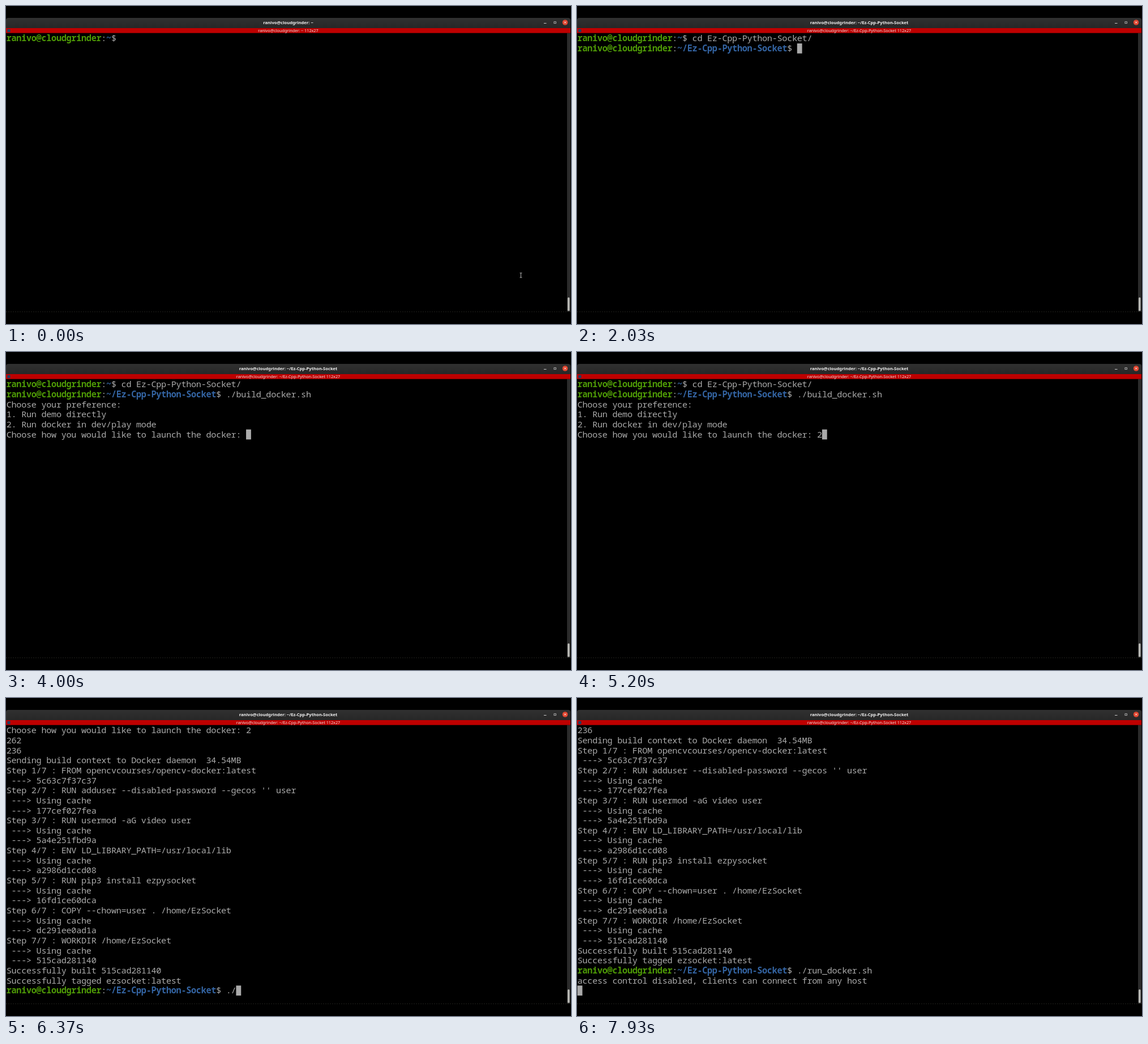
An HTML page with a canvas that plays this animation: 998x561 px, repeating every 8 s.

```html
<!DOCTYPE html>
<html lang="en">
<head>
<meta charset="utf-8">
<title>Terminal session</title>
<style>
  html, body { margin: 0; width: 100%; height: 100%; overflow: hidden; background: #000; }
  canvas { display: block; width: 998px; height: 561px; }
</style>
</head>
<body>
<canvas id="stage" width="998" height="561"></canvas>
<script>
const ctx = document.getElementById('stage').getContext('2d');
const LOOP = 8000;
const ROWS = 27, CELL = 8.82, LINE = 17.65, LEFT = 0.7, TOP = 48.4;
const GREY = '#aaaaaa', GREEN = '#4e9a06', BLUE = '#3465a4';
const MONO = '15.2px "Noto Sans Mono", "DejaVu Sans Mono", monospace';
const SANS = '"Noto Sans", "Open Sans", sans-serif';

const USER = 'ranivo@cloudgrinder';
const REPO = '~/Ez-Cpp-Python-Socket';
const prompt = dir => `${USER}:${dir}$ `;

const step = (n, command, id, cached = true) =>
  `Step ${n}/7 : ${command}\n${cached ? ' ---> Using cache\n' : ''} ---> ${id}\n`;

// Terminal output: [time in ms, text appended at that time]
const log = [
  [0, prompt('~')],
  [130, 'c'], [260, 'd'], [400, ' '],
  [1070, 'E'], [1270, 'z'], [1530, '-Cpp-Python-Socket/'],
  [2000, '\n' + prompt(REPO)],
  [2800, '.'], [2970, '/'], [3200, 'b'], [3370, 'uild_docker.sh'],
  [3770, '\nChoose your preference:\n1. Run demo directly\n' +
         '2. Run docker in dev/play mode\nChoose how you would like to launch the docker: '],
  [4970, '2'],
  [5230, '\n'], [5270, '262\n236\n'],
  [5400, 'Sending build context to Docker daemon  34.54MB\n'],
  [5470, step(1, 'FROM opencvcourses/opencv-docker:latest', '5c63c7f37c37', false)],
  [5500, step(2, "RUN adduser --disabled-password --gecos '' user", '177cef027fea')],
  [5530, step(3, 'RUN usermod -aG video user', '5a4e251fbd9a')],
  [5570, step(4, 'ENV LD_LIBRARY_PATH=/usr/local/lib', 'a2986d1ccd08')],
  [5600, step(5, 'RUN pip3 install ezpysocket', '16fd1ce60dca')],
  [5630, step(6, 'COPY --chown=user . /home/EzSocket', 'dc291ee0ad1a')],
  [5670, step(7, 'WORKDIR /home/EzSocket', '515cad281140')],
  [5700, 'Successfully built 515cad281140\nSuccessfully tagged ezsocket:latest\n' + prompt(REPO)],
  [6070, '.'], [6100, '/'],
  [6600, 'r'], [6830, 'u'], [7030, 'n_docker.sh'],
  [7470, '\n'], [7530, 'access control disabled, clients can connect from any host\n']
];

// Intervals in which the blinking cursor is off
const cursorOff = [[0, 30], [800, 1070], [2400, 2800], [4370, 4970]];

function rect(color, x, y, w, h) {
  ctx.fillStyle = color;
  ctx.fillRect(x, y, w, h);
}

function strokePath(color, width, ...lines) {
  ctx.strokeStyle = color;
  ctx.lineWidth = width;
  ctx.beginPath();
  for (const [x1, y1, x2, y2] of lines) {
    ctx.moveTo(x1, y1);
    ctx.lineTo(x2, y2);
  }
  ctx.stroke();
}

function centred(text, font, color, y) {
  ctx.font = font;
  ctx.letterSpacing = '0px';
  ctx.textAlign = 'center';
  ctx.fillStyle = color;
  ctx.fillText(text, 498.5, y);
}

function drawWindow(dir) {
  const bar = ctx.createLinearGradient(0, 21, 0, 39);
  bar.addColorStop(0, '#303030');
  bar.addColorStop(1, '#272727');
  ctx.fillStyle = bar;
  ctx.beginPath();
  ctx.roundRect(0, 21, 997, 18, [4, 4, 0, 0]);
  ctx.fill();
  rect('#be0000', 0, 39, 997, 8.7);
  rect('#1d3f63', 2.5, 41, 5, 5);

  const title = `${USER}: ${dir}`;
  centred(title, `bold 7.6px ${SANS}`, '#f2f2f2', 31.8);
  centred(`${title} 112x27`, `7.25px ${SANS}`, '#f0dcdc', 45.8);

  strokePath('#c8c8c8', 1, [950, 30.5, 954.5, 30.5]);
  ctx.lineWidth = 0.8;
  ctx.strokeRect(968, 27.7, 3.4, 3);
  ctx.fillStyle = '#e0452f';
  ctx.beginPath();
  ctx.arc(987.6, 29, 4.8, 0, Math.PI * 2);
  ctx.fill();
  strokePath('#ffffff', 0.9, [986, 27.4, 989.2, 30.6], [989.2, 27.4, 986, 30.6]);

  rect('#2b2b2b', 991, 48, 6, 491);
  ctx.fillStyle = '#b8b8b4';
  ctx.beginPath();
  ctx.roundRect(992, 514, 3.6, 24, 1.8);
  ctx.fill();

  ctx.setLineDash([2, 2]);
  strokePath('#20201c', 1, [0, 539.5, 997, 539.5]);
  ctx.setLineDash([]);
}

function drawLine(line, row) {
  const y = TOP + row * LINE + 13.9;
  let col = 0;
  const put = (text, color, weight = '') => {
    ctx.font = weight + MONO;
    ctx.letterSpacing = '0px';
    ctx.letterSpacing = `${CELL - ctx.measureText('0').width}px`;
    ctx.fillStyle = color;
    ctx.fillText(text, LEFT + col * CELL, y);
    col += text.length;
  };
  ctx.textAlign = 'left';
  if (line.startsWith(USER)) {
    const end = line.indexOf('$');
    put(USER, GREEN, 'bold ');
    put(':', GREY);
    put(line.slice(USER.length + 1, end), BLUE, 'bold ');
    put(line.slice(end), GREY);
  } else {
    put(line, GREY);
  }
}

function drawPointer() {
  strokePath('#b0b0b0', 1,
    [909.5, 471, 909.5, 479], [907.5, 471, 911.5, 471], [907.5, 479, 911.5, 479]);
}

function draw(t) {
  rect('#000', 0, 0, 998, 561);
  drawWindow(t < 2000 ? '~' : REPO);

  const text = log.filter(([at]) => at <= t).map(([, s]) => s).join('');
  const lines = text.split('\n').slice(-ROWS);
  lines.forEach(drawLine);

  if (!cursorOff.some(([from, to]) => t >= from && t < to)) {
    const row = lines.length - 1;
    rect(GREY, LEFT + lines[row].length * CELL, TOP + row * LINE, CELL, LINE);
  }
  if (t < 130) drawPointer();
}

const start = performance.now();
function tick() {
  draw((performance.now() - start) % LOOP);
  requestAnimationFrame(tick);
}
tick();
</script>
</body>
</html>
```
